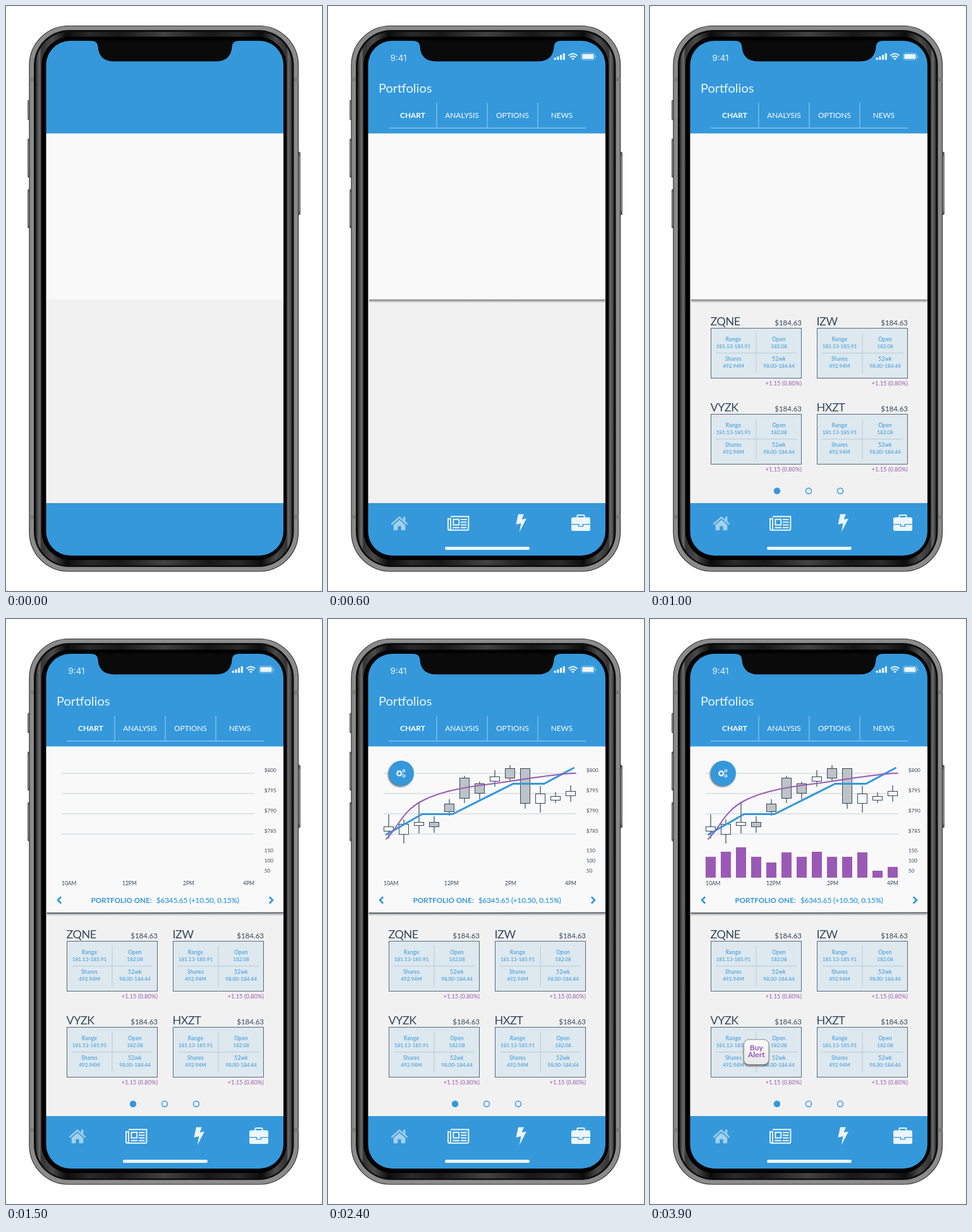
Recreate the animation shown at these times as an HTML page. Size 500x925 px, loop 5.9 s.

```html
<!DOCTYPE html>
<html lang="en">
<head>
<meta charset="utf-8">
<title>Portfolio app build-up</title>
<style>
  html, body { margin: 0; width: 100%; height: 100%; overflow: hidden; background: #fff; }
  svg { display: block; width: 500px; height: 925px; }
  text { font-family: Lato, "Open Sans", sans-serif; }
  .b { font-weight: 700; }
</style>
</head>
<body>
<svg id="stage" viewBox="0 0 500 925">
  <defs>
    <linearGradient id="bezel" gradientUnits="userSpaceOnUse" x1="47" y1="0" x2="250" y2="0" spreadMethod="reflect">
      <stop offset="0" stop-color="#222"/>
      <stop offset=".012" stop-color="#484848"/>
      <stop offset=".03" stop-color="#6c6c6c"/>
      <stop offset=".045" stop-color="#333"/>
      <stop offset=".13" stop-color="#4a4a4a"/>
      <stop offset=".24" stop-color="#0c0c0c"/>
      <stop offset=".42" stop-color="#2a2a2a"/>
      <stop offset=".65" stop-color="#181818"/>
      <stop offset="1" stop-color="#424242"/>
    </linearGradient>
    <linearGradient id="edge" x1="0" y1="0" x2="0" y2="1">
      <stop offset="0" stop-color="#444"/>
      <stop offset=".08" stop-color="#858585"/>
      <stop offset=".92" stop-color="#858585"/>
      <stop offset="1" stop-color="#444"/>
    </linearGradient>
    <linearGradient id="fade" x1="0" y1="0" x2="0" y2="1">
      <stop offset="0" stop-color="#000" stop-opacity=".5"/>
      <stop offset=".45" stop-color="#000" stop-opacity=".25"/>
      <stop offset="1" stop-color="#000" stop-opacity="0"/>
    </linearGradient>
    <linearGradient id="key" x1="0" y1="0" x2="0" y2="1">
      <stop offset="0" stop-color="#fbfbfb"/>
      <stop offset="1" stop-color="#e8e8e8"/>
    </linearGradient>
    <filter id="soft" x="-30%" y="-30%" width="160%" height="160%"><feGaussianBlur stdDeviation="1.6"/></filter>
    <clipPath id="screen"><rect x="63.5" y="55" width="375.5" height="814" rx="38"/></clipPath>
  </defs>
</svg>
<script>
const LOOP = 5900;
const BLUE = '#3498db', INK = '#34495e', PURPLE = '#9b59b6', PALE = '#ecf5fb';

const rect = (x, y, w, h, fill, more = '') =>
  `<rect x="${x}" y="${y}" width="${w}" height="${h}" fill="${fill}" ${more}/>`;
const path = (d, color, width, more = '') =>
  `<path d="${d}" fill="none" stroke="${color}" stroke-width="${width}" ${more}/>`;
const shape = (d, fill) => `<path d="${d}" fill="${fill}"/>`;
const text = (str, x, y, size, fill, more = '') =>
  `<text x="${x}" y="${y}" font-size="${size}" fill="${fill}" ${more}>${str}</text>`;
const MID = 'text-anchor="middle"', END = 'text-anchor="end"';

function phone() {
  const button = (x, y, h) => rect(x, y, 4, h, 'url(#edge)', 'rx="1.5" stroke="#555" stroke-width=".8"');
  const bands = [113, 805].map(y => rect(37.5, y, 7, 6, '#7b7b7b') + rect(455.5, y, 7, 6, '#7b7b7b')).join('');
  return button(34.5, 149, 31) + button(34.5, 210, 61) + button(34.5, 290, 61) + button(461.5, 231, 99) +
    rect(37, 31.5, 425.5, 862.5, '#8b8b8b', 'rx="62" stroke="#333" stroke-width="1.2"') + bands +
    rect(44, 38, 411.5, 849, '#0e0e0e', 'rx="56"') +
    rect(47, 41, 405.5, 843.5, 'url(#bezel)', 'rx="53"') +
    rect(56, 48.5, 388, 827.5, '#000', 'rx="46"');
}

function panels() {
  return `<g clip-path="url(#screen)">` +
    rect(63, 55, 377, 147, BLUE) + rect(63, 201.5, 377, 263, '#f9f9f9') +
    rect(63, 464, 377, 322, '#f1f1f1') + rect(63, 786, 377, 84, BLUE) + '</g>' +
    shape('M134 54H369V55Q358 55 357.5 64Q356 87.5 332 87.5H171Q147 87.5 145.5 64Q145 55 134 55Z', '#000') +
    shape('M146.5 54H356.5V64Q355 86 332 86H171Q148 86 146.5 64Z', '#0a0a0a');
}

function status() {
  const bars = [3.5, 5.5, 8, 10.5].map((h, i) => rect(357.6 + i * 4.7, 85.2 - h, 3.2, h, PALE, 'rx=".8"')).join('');
  const wifi = path('M380.5 78.6Q387.5 72 394.5 78.6M383 81.2Q387.5 77.2 392 81.2', PALE, 2) +
    shape('M385 83.2Q387.5 81.2 390 83.2L387.5 85.6Z', PALE);
  const battery = rect(400.6, 74.4, 21.4, 11, 'none', `rx="3" stroke="${PALE}" stroke-opacity=".45"`) +
    rect(402.2, 76, 18.2, 7.8, PALE, 'rx="1.6"') +
    rect(423, 78.2, 1.3, 3.6, PALE, 'rx=".6" opacity=".5"');
  return text('9:41', 98.5, 87, 13.4, PALE, 'style="font-family:Inter,sans-serif"') + bars + wifi + battery +
    rect(65, 464, 373.5, 5.5, 'url(#fade)') + rect(185, 855, 134, 5, PALE, 'rx="2.5"');
}

function header() {
  const tabs = [['CHART', 134], ['ANALYSIS', 212], ['OPTIONS', 292], ['NEWS', 370]];
  return text('Portfolios', 80, 137, 20, PALE) +
    path('M96 193H408M172 153V193M252 153V193M332 153V193', '#85c1e9', 1.3) +
    tabs.map(([s, x], i) => text(s, x, 177, 11.9, '#fff', MID + (i ? '' : ' class="b"'))).join('');
}

function nav() {
  const home = path('M100.5 819.5L113 808.6L125.5 819.5', '#a4d0ee', 2.4) +
    shape('M119 807.5H122.4V815L119 812ZM113 812.4L122.3 820.4V829H115.6V822.4H110.4V829H103.7V820.4Z', '#a4d0ee');
  const paper = path('M194 807.2H222.4V826.5Q222.4 828.8 220 828.8H192.3Q190 828.8 190 826.5V810.8H194V826Q194 828.5 192 828.8', PALE, 2) +
    path('M198.4 811.8H207.2V820.4H198.4ZM210 812H219.5M210 816.2H219.5M210 820.4H219.5M197.4 824.8H208.2M210 824.8H219.5', PALE, 2);
  const bolt = shape('M301 803.5H310L306.6 811.8L314 810.4L302.8 832L305.4 818L297.5 819.8Z', PALE);
  const bag = rect(385, 808.6, 30, 21.4, PALE, 'rx="2.8"') +
    path('M394.4 809V806.2Q394.4 805 395.6 805H404.4Q405.6 805 405.6 806.2V809', PALE, 2) +
    path('M385 819.6H396.5V822.6H403.5V819.6H415', BLUE, 1.4);
  return home + paper + bolt + bag;
}

// Runs a drawing function once per card, shifted into the 2 x 2 grid.
const cards = draw => [0, 1, 2, 3].map(i =>
  `<g transform="translate(${i % 2 * 168} ${(i >> 1) * 136})">${draw(i)}</g>`).join('');

function boxes() {
  const dots = [201, 251, 301].map((x, i) =>
    `<circle cx="${x}" cy="766.8" r="4.5" fill="${i ? 'none' : BLUE}" stroke="${BLUE}" stroke-width="1.5"/>`).join('');
  return cards(() => rect(96.5, 509.5, 143, 79, '#dde8ef', 'stroke="#58697d"') +
    path('M168 516.5V581M104 548.7H232', '#c3d4e0', 1.4)) + dots;
}

function quotes() {
  const tickers = ['ZQNE', 'IZW', 'VYZK', 'HXZT'];
  const facts = [
    ['Range', '181.13-185.91', 132, 530], ['Open', '182.08', 204, 530],
    ['Shares', '492.94M', 132, 561], ['52wk', '98.00-184.44', 204, 561]];
  return cards(i =>
    text(tickers[i], 95.5, 505, 18, INK, 'letter-spacing="-.5"') +
    text('$184.63', 240, 505, 11.5, INK, END) +
    facts.map(([name, value, x, y]) =>
      text(name, x, y, 8.6, BLUE, MID + ' letter-spacing=".2"') +
      text(value, x, y + 11, 8.2, BLUE, MID)).join('') +
    text('+1.15 (0.80%)', 240, 600, 9.4, PURPLE, END));
}

function axes() {
  const prices = ['$800', '$795', '$790', '$785'].map((s, i) => text(s, 408.7, 242 + i * 32, 8.2, INK));
  const volumes = [150, 100, 50].map((n, i) => text(n, 408.7, 369 + i * 16, 8.2, INK));
  const hours = [['10AM', 88], ['12PM', 184], ['2PM', 280], ['4PM', 375]].map(([s, x]) => text(s, x, 421, 8.5, INK));
  return path('M88 244H393M88 276H393M88 308H393M88 340H393', '#e0e4e6', 2) +
    [...prices, ...volumes, ...hours].join('') +
    path('M87.2 439.4L82.2 444.6L87.2 449.8M416.8 439.4L421.8 444.6L416.8 449.8', BLUE, 2.8) +
    text('PORTFOLIO ONE:', 134.5, 449, 11.6, BLUE, 'class="b"') +
    text('$6345.65 (+10.50, 0.15%)', 238, 449, 11.5, BLUE, `letter-spacing="-.05" stroke="${BLUE}" stroke-width=".2"`) +
    path('M64 465.2L439 464.2', INK, 1.5, 'stroke-opacity=".65"');
}

function gear(x, y, r) {
  const ring = `<circle cx="${x}" cy="${y}" r="${r}" fill="none" stroke="#fff"`;
  const step = 2 * Math.PI * (r + r * .4) / 16;
  return `${ring} stroke-width="${r * .55}"/>` +
    `<circle cx="${x}" cy="${y}" r="${r * 1.4}" fill="none" stroke="#fff" stroke-width="${r * .45}" stroke-dasharray="${step}"/>`;
}

function settings() {
  return `<circle cx="114.5" cy="246" r="19.5" fill="#000" opacity=".6" filter="url(#soft)"/>` +
    `<circle cx="116" cy="244" r="20" fill="${BLUE}"/>` +
    gear(112.8, 244.2, 3.1) + gear(120, 240, 1.7) + gear(120, 248.2, 1.7);
}

const trends = () =>
  path('M91.5 341.2L149 308.5H197L293 260.5H342L389.5 235', BLUE, 3) +
  path('M91.5 348.5C112 330 115 305 150 287C182 270.5 228 264.5 260 260.5C310 254 360 244.5 392.5 243.8', PURPLE, 2);

// Each row: wick top, body top, body bottom, wick bottom, filled.
const CANDLES = [
  [309, 328, 335, 347, 0], [317, 324, 340, 355, 0], [289, 321, 326, 339, 0], [312, 321, 328, 338, 1],
  [285, 292, 304, 311, 1], [248, 251, 283, 291, 1], [257, 260, 275, 285, 1], [239, 249, 256, 265, 0],
  [231, 236, 251, 257, 1], [236, 236, 291, 300, 1], [264, 276, 291, 306, 0], [274, 280, 286, 291, 0],
  [263, 272, 279, 289, 0]];
const candles = () => CANDLES.map(([high, top, low, foot, full], i) => {
  const x = 96 + i * 24;
  return path(`M${x} ${high}V${top}M${x} ${low}V${foot}`, INK, 1.2) +
    rect(x - 7.5, top + .5, 15, low - top, full ? '#bdc3c7' : '#f9f9f9', `stroke="${INK}"`);
}).join('');

const VOLUMES = [33, 41, 48, 33, 24, 40, 33, 41, 33, 33, 40, 11, 17];
const volumes = () => VOLUMES.map((h, i) => rect(88 + i * 24, 409 - h, 16, h, PURPLE)).join('');

const alertKey = () =>
  rect(148, 667, 40, 40, '#000', 'rx="8" opacity=".55" filter="url(#soft)"') +
  rect(148.5, 665, 39.5, 39.5, 'url(#key)', 'rx="8" stroke="#8b8b8b"') +
  text('Buy', 168.3, 682, 12, PURPLE, MID + ' class="b"') +
  text('Alert', 168.3, 693.3, 12, PURPLE, MID + ' class="b"');

// [appears at ms, drawing], listed back to front.
const LAYERS = [
  [0, phone], [0, panels], [200, status], [400, header], [600, nav], [800, boxes], [1000, quotes],
  [1500, axes], [2400, candles], [2900, volumes], [2200, trends], [1700, settings], [3900, alertKey]];

const stage = document.getElementById('stage');
const layers = LAYERS.map(([start, draw]) => {
  const node = document.createElementNS('http://www.w3.org/2000/svg', 'g');
  node.innerHTML = draw();
  stage.append(node);
  return { start, node };
});

let origin;
function tick(now) {
  origin ??= now;
  const t = (now - origin) % LOOP;
  for (const { start, node } of layers) node.style.visibility = t >= start ? 'visible' : 'hidden';
  requestAnimationFrame(tick);
}
requestAnimationFrame(tick);
</script>
</body>
</html>
```
